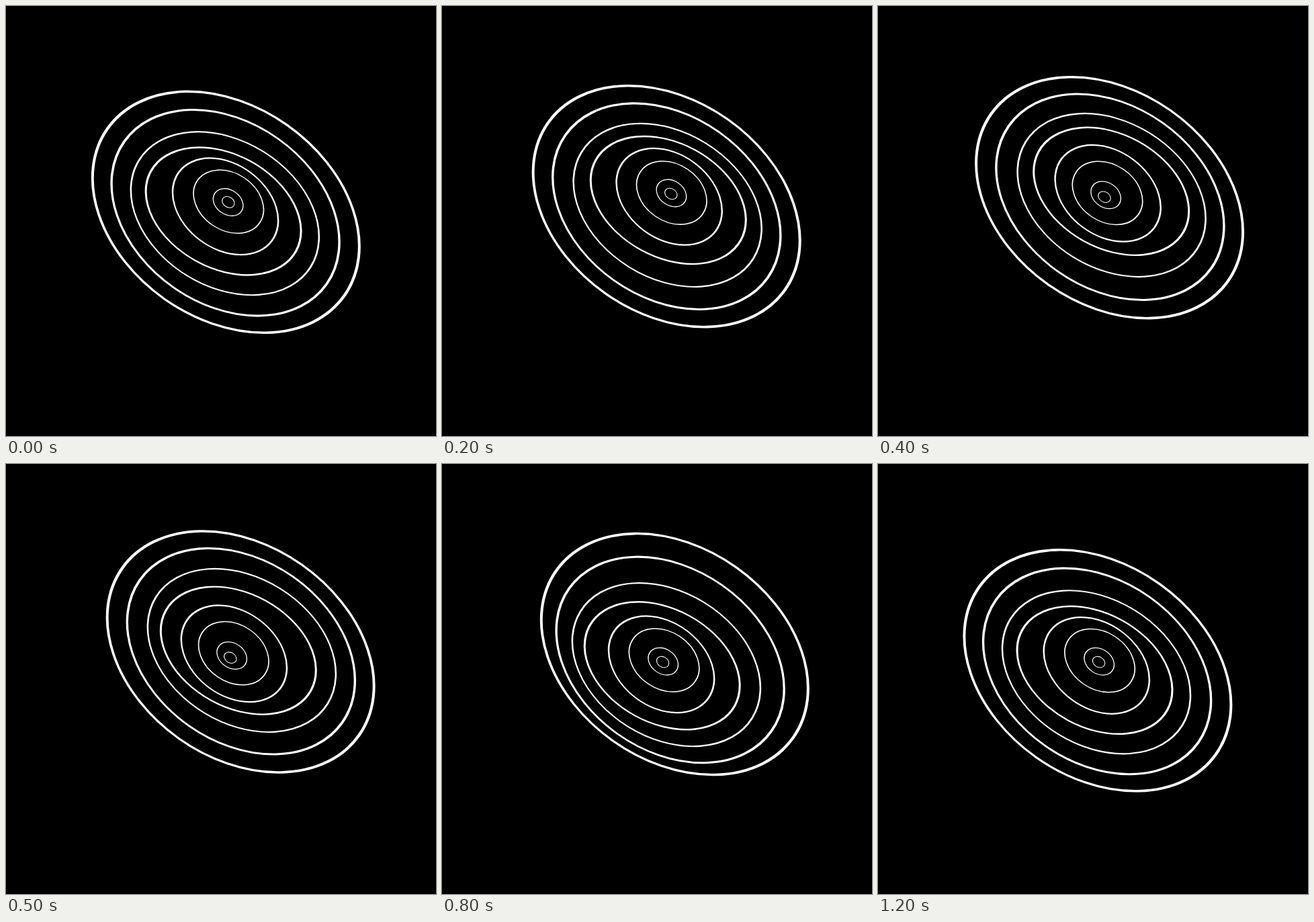
Write an HTML page that moves like this. It is 640 px wide and 640 px high and loops after 1.3 s.

```html
<!DOCTYPE html>
<html lang="en">
<head>
<meta charset="utf-8">
<title>Rippling rings</title>
<style>
  html, body { margin: 0; width: 100%; height: 100%; overflow: hidden; background: #000; }
  svg { display: block; width: 100%; height: 100%; }
  circle { fill: none; stroke: #fff; }
</style>
</head>
<body>
<svg id="stage" viewBox="0 0 640 640"></svg>
<script>
  const LOOP = 1300, STEP = 100, SLOPE = -1.25;

  // Rest centre, radii, tilt and line width; then the shift with its rise and fall spans in ms.
  const rings = [
    { x: 326.9, y: 307.3, rx: 215.7, ry: 158.4, tilt: 35.2, line: 4.3, shift: 26.2, rise: [-55, 680], fall: [640, 1120] },
    { x: 326.1, y: 308.4, rx: 184.2, ry: 135.3, tilt: 35.2, line: 3.7, shift: 26.2, rise: [-55, 630], fall: [590, 1020] },
    { x: 325.0, y: 309.8, rx: 150.4, ry: 108.4, tilt: 31.8, line: 2.7, shift: 26.2, rise: [-65, 540], fall: [520, 980] },
    { x: 322.5, y: 306.8, rx: 123.3, ry: 84.6, tilt: 28.8, line: 3.2, shift: 24.8, rise: [-60, 412], fall: [420, 960] },
    { x: 325.3, y: 299.9, rx: 86.0, ry: 62.8, tilt: 36.5, line: 2.7, shift: 17.2, rise: [-65, 330], fall: [355, 890] },
    { x: 330.1, y: 292.6, rx: 56.0, ry: 42.4, tilt: 34.0, line: 1.8, shift: 13.0, rise: [-60, 265], fall: [270, 870] },
    { x: 329.2, y: 293.8, rx: 23.9, ry: 18.3, tilt: 34.5, line: 1.5, shift: 12.5, rise: [-60, 225], fall: [230, 815] },
    { x: 328.6, y: 294.7, rx: 9.8, ry: 7.6, tilt: 33.0, line: 1.2, shift: 12.2, rise: [-70, 185], fall: [190, 755] }
  ];

  // Each ring is a flattened circle, so its line is thinner along the long sides.
  const stage = document.getElementById("stage");
  for (const ring of rings) {
    ring.node = document.createElementNS("http://www.w3.org/2000/svg", "circle");
    ring.node.setAttribute("r", ring.rx);
    ring.node.setAttribute("stroke-width", ring.line);
    stage.appendChild(ring.node);
  }

  function ease([from, to], t) {
    const u = Math.min(1, Math.max(0, (t - from) / (to - from)));
    return u * u * (3 - 2 * u);
  }

  function draw(now) {
    const t = Math.floor((now % LOOP) / STEP) * STEP;
    for (const { node, x, y, rx, ry, tilt, shift, rise, fall } of rings) {
      const d = shift * Math.min(ease(rise, t), 1 - ease(fall, t));
      node.setAttribute("transform",
        `translate(${x + d} ${y + d * SLOPE}) rotate(${tilt}) scale(1 ${ry / rx})`);
    }
  }

  const begin = performance.now();
  function tick() {
    draw(performance.now() - begin);
    requestAnimationFrame(tick);
  }
  tick();
</script>
</body>
</html>
```
